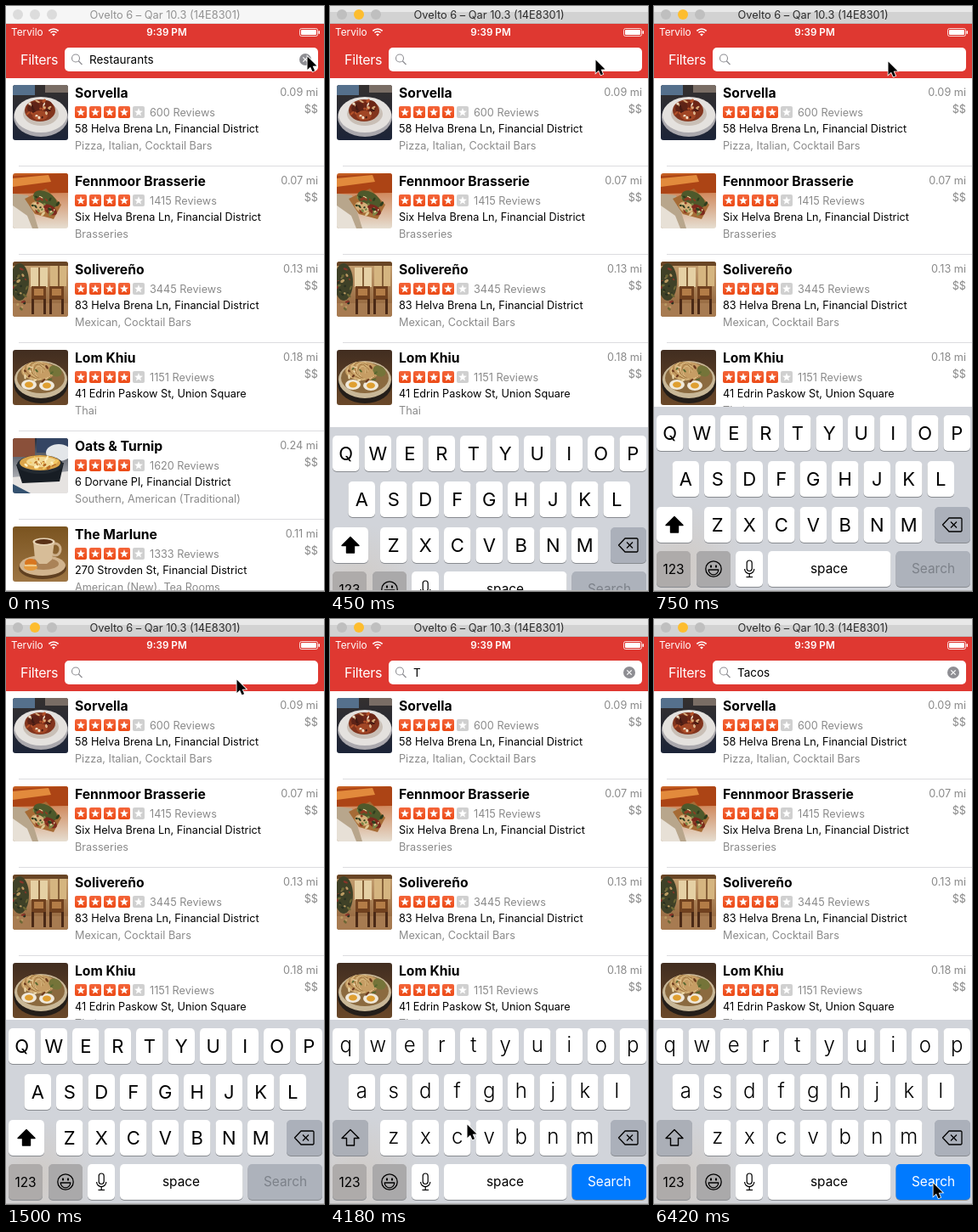
Write an HTML page with a canvas that moves like this. It is 374 px wide and 689 px high and loops after 8000 ms.

```html
<!DOCTYPE html>
<html lang="en">
<head>
<meta charset="utf-8">
<title>Restaurant search</title>
<style>
html, body { margin: 0; width: 100%; height: 100%; overflow: hidden; background: #fff; }
canvas { display: block; width: 374px; height: 689px; }
</style>
</head>
<body>
<canvas id="stage"></canvas>
<script>
const W = 374, H = 689, LOOP = 8000;
const canvas = document.getElementById('stage');
const ctx = canvas.getContext('2d');
const ratio = window.devicePixelRatio || 1;
canvas.width = Math.round(W * ratio);
canvas.height = Math.round(H * ratio);

const RED = '#df3831', GRAY = '#8a8a8a', ICON = '#8e8e93';

const places = [
  ['Sorvella', 600, '58 Helva Brena Ln, Financial District', 'Pizza, Italian, Cocktail Bars', '0.09 mi'],
  ['Fennmoor Brasserie', 1415, 'Six Helva Brena Ln, Financial District', 'Brasseries', '0.07 mi'],
  ['Solivereño', 3445, '83 Helva Brena Ln, Financial District', 'Mexican, Cocktail Bars', '0.13 mi'],
  ['Lom Khiu', 1151, '41 Edrin Paskow St, Union Square', 'Thai', '0.18 mi'],
  ['Oats & Turnip', 1620, '6 Dorvane Pl, Financial District', 'Southern, American (Traditional)', '0.24 mi'],
  ['The Marlune', 1333, '270 Strovden St, Financial District', 'American (New), Tea Rooms', '0.11 mi']
];

// time, x, y of the pointer tip
const pointer = [
  [0, 354, 59], [450, 312, 63], [600, 275, 65], [1500, 271, 71],
  [1640, 167, 314], [1940, 145, 588], [2240, 161, 595], [4920, 182, 611],
  [5070, 278, 674], [5220, 300, 700], [6270, 312, 682], [6420, 328, 664]
];
const typed = [
  [0, 'Restaurants'], [300, ''], [4180, 'T'], [4330, 'Ta'],
  [4470, 'Tac'], [4620, 'Taco'], [4770, 'Tacos']
];
const lift = [[0, 217], [300, 187], [450, 24], [600, 3], [750, 0]];

const at = (steps, t) => steps.reduce((last, s) => (t >= s[0] ? s : last));

function rect(x, y, w, h, color) {
  ctx.fillStyle = color;
  ctx.fillRect(x, y, w, h);
}

function box(x, y, w, h, r, color) {
  ctx.beginPath();
  ctx.roundRect(x, y, w, h, r);
  ctx.fillStyle = color;
  ctx.fill();
}

function oval(x, y, rx, ry, color, turn = 0) {
  ctx.beginPath();
  ctx.ellipse(x, y, rx, ry, turn, 0, Math.PI * 2);
  ctx.fillStyle = color;
  ctx.fill();
}

function path(points, close) {
  ctx.beginPath();
  points.forEach(([x, y], i) => (i ? ctx.lineTo(x, y) : ctx.moveTo(x, y)));
  if (close) ctx.closePath();
}

function poly(points, color) {
  path(points, true);
  ctx.fillStyle = color;
  ctx.fill();
}

function line(points, color, width) {
  path(points);
  ctx.strokeStyle = color;
  ctx.lineWidth = width;
  ctx.stroke();
}

function text(str, x, y, size, color, { weight = 400, align = 'left', gap = 0 } = {}) {
  ctx.font = `${weight} ${size}px Inter, "Liberation Sans", sans-serif`;
  ctx.letterSpacing = gap + 'px';
  ctx.textAlign = align;
  ctx.fillStyle = color;
  ctx.fillText(str, x, y);
}

function fade(y0, y1, from, to) {
  const g = ctx.createLinearGradient(0, y0, 0, y1);
  g.addColorStop(0, from);
  g.addColorStop(1, to);
  return g;
}

function specks(seed, n, x, y, rx, ry, colors) {
  const rnd = () => (seed = (seed * 16807) % 2147483647) / 2147483647;
  for (let i = 0; i < n; i++) {
    const a = rnd() * 6.28, d = Math.sqrt(rnd());
    oval(x + Math.cos(a) * d * rx, y + Math.sin(a) * d * ry,
      1 + rnd() * 2.2, 0.7 + rnd(), colors[i % colors.length], rnd() * 3);
  }
}

// Simplified dishes, each in a 65 px square
const dishes = [
  () => {
    rect(0, 0, 65, 65, fade(0, 65, '#34302f', '#1c2438'));
    rect(0, 0, 26, 12, '#55708c');
    rect(38, 0, 27, 9, '#796d65');
    oval(33, 38, 32, 23, '#aaa8ad');
    oval(33, 35, 31, 21, '#e4e1de');
    oval(33, 34, 21, 14, '#c9bfb6');
    oval(32, 30, 18, 13, '#82341d');
    oval(25, 27, 8, 7, '#5d2317');
    oval(39, 25, 8, 7, '#6c2616');
    oval(32, 36, 9, 6, '#a14625');
    specks(11, 24, 32, 29, 16, 11, ['#d9ae7d', '#b4522b', '#451a13', '#f0ddc4']);
  },
  () => {
    rect(0, 0, 65, 65, fade(0, 65, '#c45b1e', '#e6ded1'));
    poly([[0, 3], [65, 0], [65, 23], [0, 24]], '#ac4415');
    poly([[0, 6], [42, 2], [45, 10], [0, 16]], '#e28a3c');
    poly([[0, 24], [18, 26], [30, 65], [0, 65]], '#b8a68c');
    poly([[0, 38], [17, 50], [23, 65], [0, 65]], '#e7e0d6');
    poly([[14, 30], [39, 18], [57, 37], [48, 54], [26, 48]], '#a66b35');
    oval(38, 31, 15, 9, '#4e592b', 0.5);
    oval(30, 40, 9, 6, '#d4ae78', 0.4);
    oval(44, 43, 9, 5, '#7c291d', 0.6);
    specks(37, 28, 37, 36, 17, 14, ['#2f3d1e', '#dfc994', '#8e3b22', '#7c8847']);
  },
  () => {
    rect(0, 0, 65, 65, fade(0, 65, '#c6a172', '#8b5c35'));
    rect(0, 0, 65, 5, '#684525');
    rect(21, 7, 20, 23, '#e5d0a4');
    rect(44, 5, 19, 24, '#d5b580');
    rect(30, 7, 2, 23, '#856039');
    rect(53, 5, 2, 24, '#856039');
    rect(0, 49, 65, 16, '#a77b51');
    oval(8, 24, 11, 22, '#3f4127');
    specks(5, 26, 9, 31, 9, 26, ['#6c6735', '#293020', '#8a3428', '#b99a62']);
    for (const x of [22, 43]) {
      rect(x, 29, 17, 16, '#70411f');
      rect(x + 3, 32, 11, 8, '#b37c47');
      rect(x, 44, 3, 18, '#4a2916');
      rect(x + 14, 44, 3, 18, '#4a2916');
    }
  },
  () => {
    rect(0, 0, 65, 65, fade(0, 65, '#412d20', '#6a4829'));
    oval(33, 40, 32, 23, '#241e19');
    oval(33, 35, 31, 22, '#c8b797');
    oval(33, 33, 28, 18, '#8b6a3f');
    oval(30, 25, 20, 11, '#c69d64');
    for (let i = 0; i < 7; i++) {
      ctx.beginPath();
      ctx.ellipse(30, 25, 18 - i * 2, 10 - i, i * 0.3, 0, 5);
      ctx.strokeStyle = i % 2 ? '#9f743e' : '#e1c38a';
      ctx.lineWidth = 1;
      ctx.stroke();
    }
    oval(50, 25, 8, 6, '#757439', 0.5);
    for (const [x, y] of [[19, 41], [40, 42]]) {
      oval(x, y, 9, 6, '#f0e9db');
      oval(x, y, 5, 3.5, '#df9f31');
    }
    specks(71, 12, 33, 27, 22, 10, ['#596830', '#ead6a9', '#6d3b1e']);
  },
  () => {
    rect(0, 0, 65, 65, fade(0, 65, '#252c39', '#dfdfe2'));
    rect(0, 0, 26, 22, '#8a503a');
    rect(28, 0, 37, 17, '#344563');
    oval(54, 17, 15, 10, '#e3e6e9');
    poly([[0, 46], [65, 39], [65, 65], [0, 65]], '#e6e3e1');
    poly([[0, 54], [21, 65], [0, 65]], '#34516f');
    poly([[4, 31], [60, 29], [55, 51], [11, 53]], '#171d24');
    oval(32, 31, 27, 11, '#222930');
    oval(32, 29, 24, 9, '#dba54a');
    oval(34, 28, 18, 6, '#f1d893');
    specks(19, 24, 32, 29, 20, 7, ['#fff0c0', '#b66c24', '#f4c963']);
  },
  () => {
    rect(0, 0, 65, 65, fade(0, 65, '#7a5420', '#9d7544'));
    oval(35, 49, 28, 13, '#604021');
    oval(35, 46, 27, 12, '#d1b38d');
    oval(36, 44, 18, 7, '#aa8257');
    ctx.beginPath();
    ctx.ellipse(50, 27, 6, 7, 0, 0, 6.3);
    ctx.strokeStyle = '#cdb08b';
    ctx.lineWidth = 3;
    ctx.stroke();
    poly([[24, 17], [49, 17], [46, 39], [40, 44], [31, 44], [26, 38]], '#d7bd98');
    oval(36.5, 18, 13, 4.5, '#e7d4b6');
    oval(36.5, 18, 10.5, 3, '#5a3217');
    oval(21, 43, 7, 5, '#d87620');
    oval(21, 48, 8, 4, '#e49a3e');
    rect(14, 45, 14, 2, '#f1c988');
  }
];

function star(x, y, on) {
  box(x, y, 14, 14, 2, on ? fade(y, y + 14, '#f4653a', '#ec4a16') : '#d0d0d0');
  const points = [];
  for (let i = 0; i < 10; i++) {
    const r = i % 2 ? 2.2 : 5.2, a = i * Math.PI / 5 - Math.PI / 2;
    points.push([x + 7 + r * Math.cos(a), y + 7.3 + r * Math.sin(a)]);
  }
  poly(points, '#fff');
}

function row(place, i) {
  const y = 85 + i * 104;
  const [name, count, street, kind, miles] = place;
  ctx.save();
  ctx.translate(8, y + 8);
  ctx.beginPath();
  ctx.roundRect(0, 0, 65, 65, 3);
  ctx.clip();
  dishes[i]();
  ctx.restore();
  text(name, 81, y + 23, 15.7, '#000', { weight: 700 });
  for (let s = 0; s < 5; s++) star(81 + s * 17, y + 33, s < 4);
  text(count + ' Reviews', 169, y + 44.5, 12.7, GRAY);
  text(street, 81, y + 64, 12.7, '#000');
  text(kind, 81, y + 84, 12.7, GRAY);
  text(miles, 367, y + 20.5, 12.7, GRAY, { align: 'right' });
  text('$$', 367, y + 41, 12.7, GRAY, { align: 'right' });
  rect(15, y + 103, W - 15, 1, '#dcdcdf');
}

function titleBar(active) {
  rect(0, 0, W, 21, active ? '#e8e8e8' : '#f6f6f6');
  if (active) rect(0, 7, W, 14, '#d2d2d2');
  rect(0, 20, W, 1, active ? '#bcbcbc' : '#dedede');
  [14, 34, 54].forEach((x, i) =>
    oval(x, 10, 6, 6, !active ? '#dcdcdc' : i === 1 ? '#fdbd2f' : '#bfbfbf'));
  text('Ovelto 6 – Qar 10.3 (14E8301)', 187, 15, 12.8, active ? '#2c2c2c' : '#929292',
    { align: 'center' });
}

function header(query) {
  rect(0, 21, W, 64, RED);
  text('Tervilo', 6, 35, 11.8, '#fff');
  text('9:39 PM', 189, 35, 11.7, '#fff', { weight: 600, align: 'center' });
  ctx.strokeStyle = '#fff';
  ctx.lineWidth = 1.6;
  for (const r of [8, 5]) {
    ctx.beginPath();
    ctx.arc(56, 35, r, -Math.PI * 0.75, -Math.PI * 0.25);
    ctx.stroke();
  }
  poly([[56, 35.5], [54, 33.2], [56, 32.4], [58, 33.2]], '#fff');

  ctx.beginPath();
  ctx.roundRect(345.5, 26.5, 21, 9, 2);
  ctx.lineWidth = 0.8;
  ctx.stroke();
  box(347, 28, 18, 6, 1, '#fff');
  box(367.5, 29, 1.5, 4, 1, '#fff');

  text('Filters', 17, 69, 16, '#fff', { gap: -0.3 });
  box(69, 49, 298, 28, 5, '#fff');
  ctx.beginPath();
  ctx.arc(82, 61.5, 4.5, 0, 6.3);
  ctx.strokeStyle = ICON;
  ctx.lineWidth = 1.1;
  ctx.stroke();
  line([[85.3, 64.8], [89.5, 69]], ICON, 1.3);
  if (!query) return;
  text(query, 98, 67.5, 13.5, '#000');
  oval(352, 63, 7, 7, ICON);
  line([[349.3, 60.3], [354.7, 65.7]], '#fff', 1.2);
  line([[354.7, 60.3], [349.3, 65.7]], '#fff', 1.2);
}

function key(x, y, w, color) {
  box(x, y + 1, w, 42, 5, '#888b90');
  box(x, y, w, 42, 5, color);
}

function letters(str, x, y, upper) {
  [...str].forEach((ch, i) => {
    const kx = x + i * 37.5;
    key(kx, y, 31.5, '#fff');
    if (upper) text(ch, kx + 15.75, y + 29, 22, '#000', { align: 'center' });
    else text(ch.toLowerCase(), kx + 15.75, y + 28, 24, '#000', { align: 'center', weight: 300 });
  });
}

function shiftKey(upper) {
  key(3, 590, 42, upper ? '#fff' : '#abafb7');
  path([[24, 601.5], [34, 611.5], [28.5, 611.5], [28.5, 620], [19.5, 620], [19.5, 611.5], [14, 611.5]], true);
  ctx.lineJoin = 'round';
  ctx.lineWidth = 1.4;
  ctx.strokeStyle = ctx.fillStyle = '#000';
  ctx.stroke();
  if (upper) ctx.fill();
}

function deleteKey() {
  key(330, 590, 42, '#abb0ba');
  path([[339.5, 611], [347, 603], [361, 603], [362, 604], [362, 618], [361, 619], [347, 619]], true);
  ctx.strokeStyle = '#000';
  ctx.lineWidth = 1.3;
  ctx.stroke();
  line([[349, 607.5], [356, 614.5]], '#000', 1.3);
  line([[356, 607.5], [349, 614.5]], '#000', 1.3);
}

function smileyKey() {
  key(50, 642, 40, '#aaa9aa');
  ctx.beginPath();
  ctx.arc(70, 663, 9.2, 0, 6.3);
  ctx.strokeStyle = '#000';
  ctx.lineWidth = 1.3;
  ctx.stroke();
  oval(67, 660, 1.1, 1.7, '#000');
  oval(73, 660, 1.1, 1.7, '#000');
  ctx.beginPath();
  ctx.arc(70, 664, 5.8, 0, Math.PI);
  ctx.closePath();
  ctx.stroke();
}

function micKey() {
  key(96, 642, 32, '#fff');
  ctx.beginPath();
  ctx.roundRect(109.2, 653, 6, 12.5, 3);
  ctx.strokeStyle = '#000';
  ctx.lineWidth = 1.2;
  ctx.stroke();
  ctx.beginPath();
  ctx.arc(112.2, 663, 5.6, 0, Math.PI);
  ctx.stroke();
  line([[112.2, 668.6], [112.2, 672.5]], '#000', 1.2);
  line([[108.5, 672.5], [116, 672.5]], '#000', 1.2);
}

function keyboard(drop, upper) {
  ctx.save();
  ctx.translate(0, drop);
  rect(0, 472, W, 217, '#d1d4da');
  const tint = ctx.createRadialGradient(35, 660, 5, 35, 660, 75);
  tint.addColorStop(0, 'rgba(208,200,192,.7)');
  tint.addColorStop(1, 'rgba(208,200,192,0)');
  rect(0, 580, 120, 109, tint);
  letters('QWERTYUIOP', 3, 482, upper);
  letters('ASDFGHJKL', 21.5, 536, upper);
  letters('ZXCVBNM', 59, 590, upper);
  shiftKey(upper);
  deleteKey();
  key(3, 642, 40, '#aeabaa');
  text('123', 23, 668.5, 15.4, '#000', { align: 'center' });
  smileyKey();
  micKey();
  key(134, 642, 144.5, '#fff');
  text('space', 206, 668, 15.4, '#000', { align: 'center' });
  key(284.5, 642, 87.5, upper ? '#adb2bb' : '#007aff');
  text('Search', 328.5, 668, 15.4, upper ? '#7c8189' : '#fff', { align: 'center' });
  ctx.restore();
}

function arrow(x, y) {
  const shape = [[0, 0], [0, 15.5], [3.5, 12.2], [6, 17.8], [8.6, 16.7], [6.2, 11.2], [11, 11]];
  path(shape.map(([a, b]) => [x + 0.5 + a, y + 0.5 + b]), true);
  ctx.lineJoin = 'miter';
  ctx.strokeStyle = '#fff';
  ctx.lineWidth = 1.6;
  ctx.stroke();
  ctx.fillStyle = '#000';
  ctx.fill();
}

function draw(t) {
  const query = at(typed, t)[1];
  const [, px, py] = at(pointer, t);
  ctx.setTransform(ratio, 0, 0, ratio, 0, 0);
  rect(0, 0, W, H, '#fff');
  places.forEach(row);
  header(query);
  titleBar(t >= 150);
  if (t >= 300) keyboard(at(lift, t)[1], t < 4180);
  rect(0, 688, W, 1, '#b9b9b9');
  arrow(px, py);
}

const start = performance.now();
function tick() {
  draw((performance.now() - start) % LOOP);
  requestAnimationFrame(tick);
}
tick();
</script>
</body>
</html>
```
